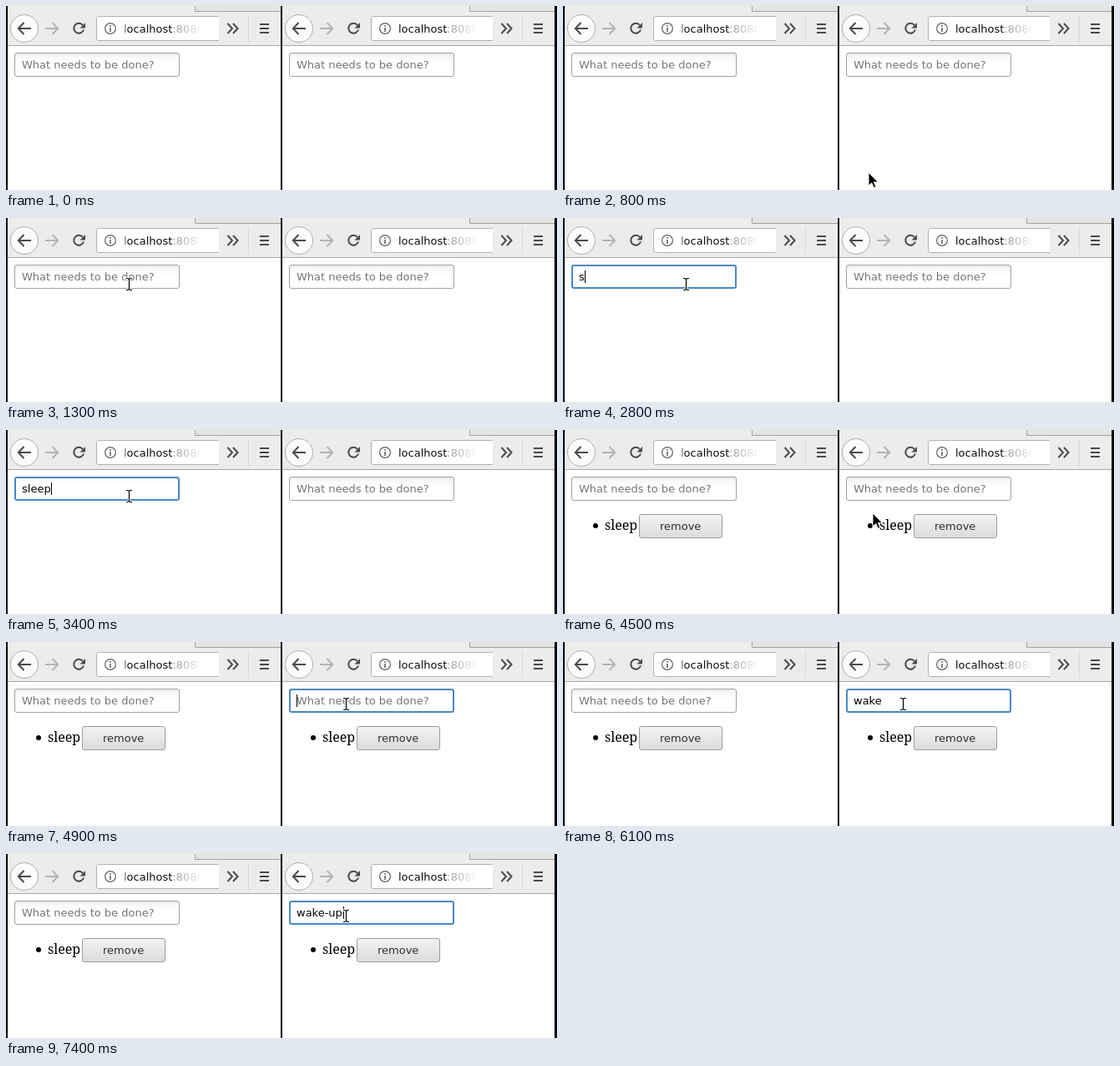
Recreate the animation shown at these times as an HTML page. Size 660 by 221 pixels, loop 8 s.

```html
<!DOCTYPE html>
<html lang="en">
<head>
<meta charset="utf-8">
<title>Two synced to-do lists</title>
<style>
  html, body { margin: 0; width: 100%; height: 100%; overflow: hidden; background: #000; }
  #stage { position: relative; width: 660px; height: 221px; overflow: hidden; background: #000; }
  .win, .win > *, #pointer { position: absolute; }
  .win { top: 0; left: 0; width: 330px; height: 221px; }
  .win svg { left: 0; top: 0; }
  .win span { font: 13px/15px "DejaVu Sans", sans-serif; white-space: pre; }
  .edge { top: 0; width: 1px; height: 221px; background: #000; }
  .active .edge { background: #101024; }
  .url { left: 141px; top: 20px; width: 94px; overflow: hidden; color: #0c0c0c; }
  .url i { font-style: normal; color: #999; }
  .field { left: 10px; top: 56px; width: 198px; height: 29px; box-sizing: border-box;
    border: 1px solid #a0a0a0; border-radius: 3px;
    background: linear-gradient(#ececec, #f8f8f8 4px, #fff 12px); }
  .focus .field { border: 2px solid #4a88c9; background: linear-gradient(#f4f4f4, #fff 4px); }
  .win .text { left: 19px; top: 63px; color: #000; }
  .win .text.hint { color: #757575; }
  .caret { top: 63px; width: 1px; height: 15px; background: #000; }
  .item { left: 0; top: 0; }
  .item > * { position: absolute; }
  .dot { left: 36px; top: 112px; width: 6px; height: 6px; border-radius: 50%; background: #000; }
  .win .name { left: 50px; top: 103px; font: 16px/22px "Noto Serif", serif; color: #000; }
  .button { left: 91px; top: 101px; width: 100px; height: 29px; box-sizing: border-box;
    border: 1px solid #9c9c9c; border-radius: 3px; background: linear-gradient(#f2f2f2, #dcdcdc); }
  .win .label { left: 116px; top: 108px; color: #2e2e2e; }
  #pointer { left: 0; top: 0; overflow: visible; }
</style>
</head>
<body>
<div id="stage"></div>
<script>
const LOOP = 8000;
const HINT = 'What needs to be done?';
const ADVANCE = { s: 7, l: 4, e: 8, p: 8, w: 11, a: 8, k: 8, '-': 5, u: 8 };

// [time, focused, text, caret shown]
const FIELDS = [
  [[0, 0, '', 0], [1700, 1, '', 1], [2800, 1, 's', 1], [2900, 1, 'sl', 1], [3000, 1, 'sle', 1],
   [3200, 1, 'slee', 1], [3400, 1, 'sleep', 1], [3700, 1, '', 1], [4100, 1, '', 0], [4500, 0, '', 0]],
  [[0, 0, '', 0], [4900, 1, '', 1], [5400, 1, 'w', 1], [5600, 1, 'wa', 1], [5800, 1, 'wak', 1],
   [5900, 1, 'wake', 1], [6100, 1, 'wake', 0], [6800, 1, 'wake-', 1], [7200, 1, 'wake-u', 1],
   [7400, 1, 'wake-up', 1]]
];

// [time, x, y, shape]
const POINTER = [
  [0, 0, 0, ''], [800, 366, 200, 'arrow'], [900, 304, 162, 'arrow'], [1000, 240, 128, 'arrow'],
  [1100, 188, 100, 'arrow'], [1200, 156, 82, 'beam'], [1300, 147, 79, 'beam'],
  [4300, 186, 83, 'beam'], [4400, 278, 97, 'arrow'], [4500, 371, 100, 'arrow'],
  [4600, 399, 88, 'arrow'], [4700, 407, 74, 'beam']
];

// [time, index of the active window]
const ACTIVE = [[0, 1], [900, 0], [4500, 1]];
const ITEM_TIME = 3700;

const at = (steps, t) => steps.reduce((last, step) => step[0] <= t ? step : last);

const stroke = (d, color = '#4a4a4a', width = 2) =>
  `<path d="${d}" fill="none" stroke="${color}" stroke-width="${width}"/>`;

// Items on the right of the toolbar follow the window width.
function toolbar(width) {
  const end = width - 329;
  const right = width;
  return `<svg width="330" height="221">
    <rect x="2" width="${right - 2}" height="221" fill="#fff"/>
    <rect x="2" width="${right - 2}" height="47" fill="#ececec"/>
    <rect x="2" y="47" width="${right - 2}" height="1" fill="#a8a8a8"/>
    <rect x="227" width="${right - 227}" height="6" fill="#e4e4e4"/>
    ${stroke(`M226.5 0V6.5H${right}`, '#a2a2a2', 1)}
    <circle cx="22" cy="27" r="16.5" fill="#fbfbfb" stroke="#adadad"/>
    ${stroke('M15 27H30M21.5 20L14.8 27L21.5 34')}
    ${stroke('M47 27H62M55.5 20L62.2 27L55.5 34', '#b4b4b4')}
    ${stroke('M92 23A6 6 0 1 0 93 28.5')}
    <path d="M95 20V26.5H88.5Z" fill="#4a4a4a"/>
    <path d="M${255 + end} 12H111Q108 12 108 15V39Q108 42 111 42H${255 + end}Z" fill="#fff"/>
    ${stroke(`M${255 + end} 12.5H111Q108.5 12.5 108.5 15V39Q108.5 41.5 111 41.5H${255 + end}`, '#b2b2b2', 1)}
    <circle cx="125" cy="27" r="6.4" fill="none" stroke="#606060" stroke-width="1.2"/>
    ${stroke('M125 26V31M125 23V24.7', '#606060', 1.6)}
    <g transform="translate(${end} 0)">
      ${stroke('M265.5 21L271 27L265.5 33M272 21L277.5 27L272 33')}
      ${stroke('M290.5 10V44', '#dadada', 1)}
      ${stroke('M304 22H315M304 27H315M304 32H315')}
    </g>
  </svg>`;
}

function makeWindow(index) {
  const width = 329 - index;
  const win = document.createElement('div');
  win.style.left = index * 329 + 'px';
  const fadeIn = index ? '#000 0' : 'rgba(0,0,0,.35) 0, #000 5px';
  win.innerHTML = toolbar(width) + `
    <div class="edge" style="left:1px"></div>
    <div class="edge" style="left:${width}px"></div>
    <span class="url">localhost<i>:8080</i></span>
    <div class="field"></div>
    <span class="text"></span>
    <div class="caret"></div>
    <div class="item">
      <div class="dot"></div><span class="name">sleep</span>
      <div class="button"></div><span class="label">remove</span>
    </div>`;
  const find = name => win.querySelector('.' + name);
  const mask = `linear-gradient(90deg, ${fadeIn}, #000 62px, transparent 95px)`;
  find('url').style.webkitMaskImage = mask;
  find('url').style.maskImage = mask;
  stage.append(win);
  return { win, text: find('text'), caret: find('caret'), item: find('item') };
}

const stage = document.getElementById('stage');
const windows = [0, 1].map(makeWindow);

const BEAM = 'M-3 -6.5H-1L0.5 -5.5L2 -6.5H4M0.5 -5.5V6.5M-3 7.5H-1L0.5 6.5L2 7.5H4';
stage.insertAdjacentHTML('beforeend', `<svg id="pointer" width="660" height="221">
  <g id="beam">${stroke(BEAM, '#fff', 3)}${stroke(BEAM, '#000', 1.2)}</g>
  <path id="arrow" d="M0 0V16L3.8 12.6L6.4 18.4L9 17.2L6.4 11.6H11.4Z"
    fill="#000" stroke="#fff" stroke-width="1"/>
</svg>`);
const shapes = ['beam', 'arrow'].map(id => document.getElementById(id));

const show = (el, on) => { el.style.visibility = on ? 'visible' : 'hidden'; };

function draw(t) {
  const active = at(ACTIVE, t)[1];
  windows.forEach(({ win, text, caret, item }, i) => {
    const [, focused, value, caretOn] = at(FIELDS[i], t);
    win.className = 'win' + (active === i ? ' active' : '') + (focused ? ' focus' : '');
    text.className = value ? 'text' : 'text hint';
    text.textContent = value || HINT;
    caret.style.left = [...value].reduce((x, c) => x + ADVANCE[c], 19) + 'px';
    show(caret, caretOn);
    show(item, t >= ITEM_TIME);
  });
  const [, x, y, shape] = at(POINTER, t);
  for (const el of shapes) {
    show(el, el.id === shape);
    el.setAttribute('transform', `translate(${x} ${y})`);
  }
}

const start = performance.now();
function tick() {
  draw((performance.now() - start) % LOOP);
  requestAnimationFrame(tick);
}
tick();
</script>
</body>
</html>
```
